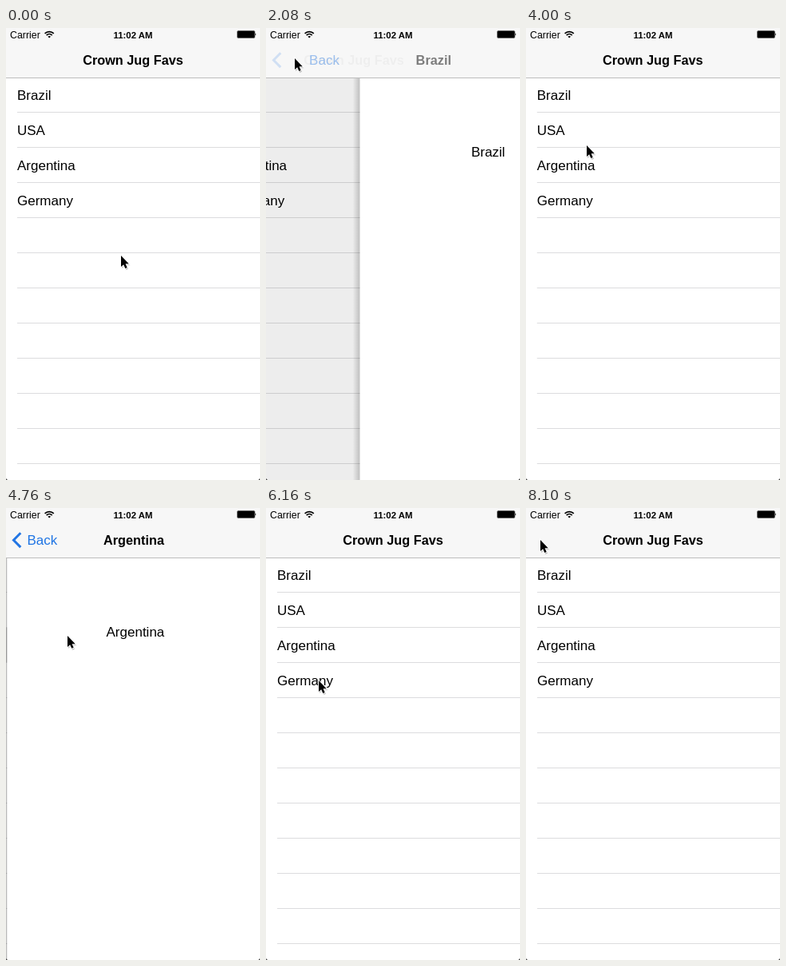
These frames come from a looping animation (318x566 px, 8.22 s). An HTML page:

```html
<!DOCTYPE html>
<html lang="en">
<head>
<meta charset="utf-8">
<title>Favourites list</title>
<style>
  html, body { margin: 0; width: 100%; height: 100%; overflow: hidden; background: #fff; }
  svg { display: block; width: 318px; height: 566px; }
  text { font: 17px "Liberation Sans", Arial, sans-serif; fill: #000; }
  .title { font-size: 16.3px; font-weight: bold; text-anchor: middle; }
  .label { text-anchor: middle; }
  .carrier { font-size: 12.4px; }
  .clock { font-size: 11.4px; font-weight: bold; text-anchor: middle; }
  .blue { fill: #1f74e4; }
</style>
</head>
<body>
<svg viewBox="0 0 318 566">
  <defs>
    <linearGradient id="edge">
      <stop offset="0" stop-opacity="0"/>
      <stop offset="1" stop-opacity=".2"/>
    </linearGradient>
  </defs>
  <rect width="318" height="566" fill="#fff"/>

  <g id="list">
    <rect id="mark" y="62" width="420" height="44" fill="#d0d0d0"/>
  </g>
  <rect id="dim" y="62" width="318" height="504"/>

  <g id="page">
    <rect id="shadow" x="-9" y="62" width="9" height="504" fill="url(#edge)"/>
    <rect y="62" width="320" height="504" fill="#fff"/>
    <text id="label" class="label" x="160.5" y="161"></text>
  </g>

  <rect width="318" height="62" fill="#f7f7f7"/>
  <rect y="62" width="318" height="1" fill="#bdbdbd"/>
  <text id="home" class="title" y="46">Crown Jug Favs</text>
  <text id="name" class="title" y="46"></text>
  <path id="chevron" d="M18.3 31.3 9.5 40.2l8.8 8.9" fill="none" stroke="#1f74e4" stroke-width="3"/>
  <text id="back" class="blue" y="46">Back</text>

  <text class="carrier" x="5" y="13">Carrier</text>
  <g fill="none" stroke="#000" stroke-width="1.7">
    <path d="M48.6 6.9a8 8 0 0 1 11.2 0M50.7 9.1a5 5 0 0 1 7 0"/>
    <path d="M54.2 12.6 52.4 10.8a2.6 2.6 0 0 1 3.6 0z" fill="#000" stroke="none"/>
  </g>
  <text class="clock" x="159" y="12.5">11:02 AM</text>
  <rect x="289.5" y="3.5" width="22" height="9" rx="1.5" stroke="#666"/>
  <path d="M312 6.3q1.8 1.7 0 3.4z"/>
  <path d="M0 564v2h2zM318 564v2h-2z" fill="#444"/>

  <g id="cursor">
    <path d="M1 2V16l3-2.6 2.2 4.7 3-1.3L7 12.2h4.5z" opacity=".22"/>
    <path d="M0 0V14l3.2-2.8 2.1 4.7 2.4-1-2.1-4.6h4.2z" stroke="#fff" stroke-width="1.8" paint-order="stroke"/>
  </g>
</svg>
<script>
const LOOP = 8220, SLIDE = 360, WIDTH = 320, ROW = 44, MID = 159;
const $ = id => document.getElementById(id);
const list = $("list"), mark = $("mark"), dim = $("dim");
const page = $("page"), shadow = $("shadow"), label = $("label");
const home = $("home"), name = $("name"), chevron = $("chevron"), back = $("back"), cursor = $("cursor");

// Times at which each country's page opens, Back is pressed, and the page closes.
const visits = [
  { country: "Brazil", open: 1025, press: 1940, close: 2030 },
  { country: "USA", open: 2862, press: 3640, close: 3690 },
  { country: "Argentina", open: 4460, press: 5340, close: 5438 },
  { country: "Germany", open: 6310, press: 7160, close: 7250 }
];

// Pointer stops: time, x, y.
const stops = [
  [0, 144, 285], [340, 144, 285], [940, 53, 85], [1240, 53, 85],
  [1780, 36, 38], [2120, 36, 38], [2740, 75, 125], [3080, 75, 125],
  [3640, 40, 37], [3740, 40, 37], [4000, 76, 147], [4180, 80, 170],
  [4660, 80, 170], [5260, 40, 37], [5560, 40, 37], [6160, 66, 216],
  [6360, 66, 216], [6640, 30, 96], [7000, 18, 40], [LOOP, 18, 40]
];

function add(tag, attrs, text = "") {
  const el = document.createElementNS("http://www.w3.org/2000/svg", tag);
  for (const key in attrs) el.setAttribute(key, attrs[key]);
  el.textContent = text;
  list.append(el);
}
for (let i = 0; i < 11; i++) {
  add("rect", { x: 14, y: 105 + i * ROW, width: 420, height: 1, fill: "#dcdcde" });
  if (visits[i]) add("text", { x: 14, y: 90 + i * ROW }, visits[i].country);
}

const clamp = v => Math.min(1, Math.max(0, v));
const settle = dt => 1 - (1 - clamp(dt / SLIDE)) ** 3;
const smooth = u => u * u * (3 - 2 * u);
const move = (el, x, y = 0) => el.setAttribute("transform", `translate(${x} ${y})`);
const fade = (el, alpha) => el.setAttribute("opacity", alpha);

function pointer(t) {
  const i = stops.findIndex(s => s[0] > t);
  const [t0, x0, y0] = stops[i - 1], [t1, x1, y1] = stops[i];
  const u = smooth((t - t0) / (t1 - t0));
  move(cursor, x0 + (x1 - x0) * u, y0 + (y1 - y0) * u);
}

function draw(t) {
  const row = Math.max(0, visits.findLastIndex(v => t >= v.open - 20));
  const v = visits[row], closing = t >= v.close;
  const shown = closing ? 1 - settle(t - v.close) : settle(t - v.open);
  if (label.textContent !== v.country) label.textContent = name.textContent = v.country;

  move(list, -96 * shown);
  mark.setAttribute("y", 62 + row * ROW);
  fade(mark, t >= v.open - 20 && !closing ? 1 : 0);
  fade(dim, 0.11 * shown);
  fade(shadow, clamp(shown * 2));
  move(page, WIDTH * (1 - shown));
  page.setAttribute("visibility", shown > 0 ? "visible" : "hidden");

  // The bar lags a little behind the page on the way back.
  const p = closing ? 1 - (1 - shown) ** 1.4 : shown, q = 1 - p;
  const held = t >= v.press ? 0.55 : 1;
  move(home, MID - 65 * p);
  move(name, MID + (184 + name.getComputedTextLength() / 2) * q);
  move(back, 26 + 114 * q);
  fade(home, q ** (closing ? 2.5 : 1.5));
  fade(name, p ** (closing ? 2.5 : 1));
  fade(back, held * p ** (closing ? 1 : 2));
  fade(chevron, held * p ** 4);
  pointer(t);
}

const start = performance.now();
function tick() {
  draw((performance.now() - start) % LOOP);
  requestAnimationFrame(tick);
}
tick();
</script>
</body>
</html>
```
